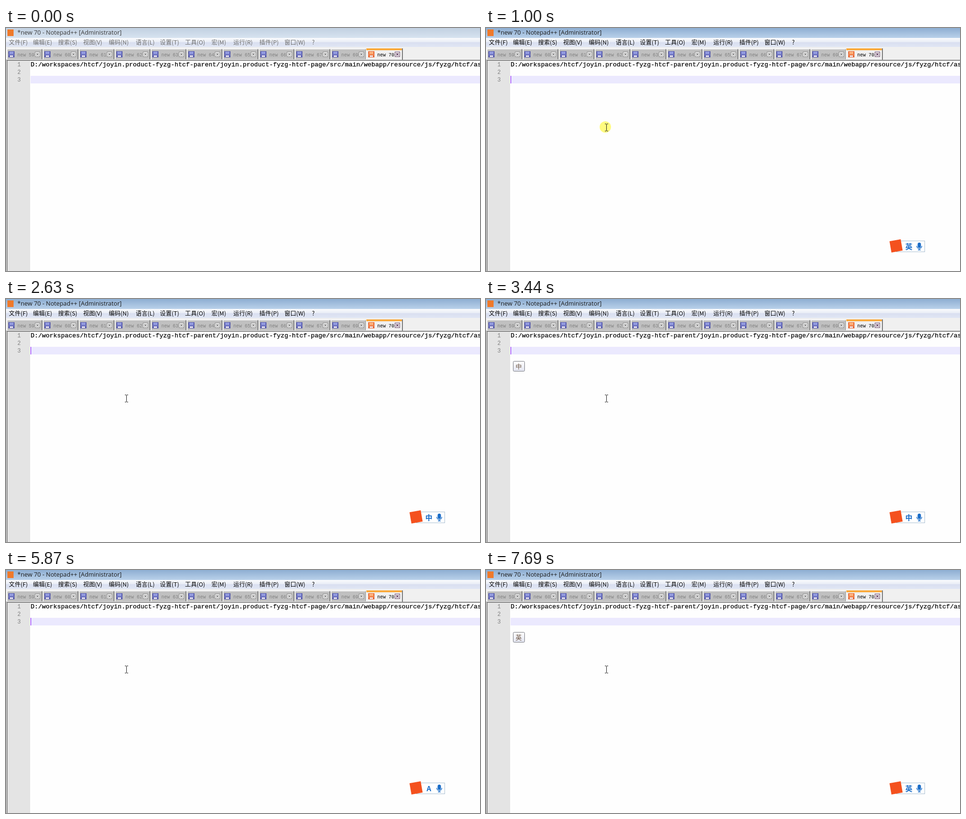
An HTML page that plays this animation: 1001x513 px, repeating every 8 s.

```html
<!DOCTYPE html>
<html lang="zh-CN">
<head>
<meta charset="utf-8">
<title>Editor input mode</title>
<style>
html, body { margin: 0; width: 100%; height: 100%; overflow: hidden; background: #fff; }
svg { display: block; }
text { white-space: pre; }
.title { font: 12.75px "Open Sans", "Noto Sans", sans-serif; fill: #1c1c1c; }
.menu { font: 12.4px "Noto Sans CJK SC", "Noto Sans CJK", sans-serif; fill: #000; }
.tab { font: 10px "Liberation Mono", monospace; fill: #808080; }
.tab.on { fill: #000; }
.code { font: 13.333px "Liberation Mono", monospace; stroke: #000; stroke-width: .25px; }
.num { font: 12px "Liberation Mono", monospace; fill: #808080; }
.mode { font: bold 15px "Noto Sans CJK SC", "Noto Sans CJK", sans-serif; fill: #1a6dc8; text-anchor: middle; }
.hint { font: 13px "Noto Sans CJK SC", "Noto Sans CJK", sans-serif; fill: #69513c; text-anchor: middle; }
.idle .menu { fill: #6d6d6d; }
.idle .title { fill: #3a3a3a; }
</style>
</head>
<body>
<svg id="stage" width="1001" height="513" viewBox="0 0 1001 513">
  <defs>
    <linearGradient id="active" x2="0" y2="1"><stop stop-color="#8eaed2"/><stop offset="1" stop-color="#b9d1ea"/></linearGradient>
    <linearGradient id="idle" x2="0" y2="1"><stop stop-color="#c1d0e1"/><stop offset="1" stop-color="#d7e3f0"/></linearGradient>
    <linearGradient id="menubar" x2="0" y2="1">
      <stop stop-color="#fafbfd"/><stop offset=".45" stop-color="#e9edf6"/>
      <stop offset=".5" stop-color="#d9dff0"/><stop offset="1" stop-color="#e0e6f4"/>
    </linearGradient>
    <linearGradient id="button" x2="0" y2="1"><stop stop-color="#fff"/><stop offset="1" stop-color="#e2e4f0"/></linearGradient>
  </defs>
  <rect width="1001" height="513" fill="#fefefe"/>
  <rect id="titlebar" width="1001" height="21"/>
  <rect x="3" y="3" width="13" height="14" fill="#ee7a2c"/>
  <text class="title" x="24" y="14">*new 70 - Notepad++ [Administrator]</text>
  <rect y="21" width="1001" height="19" fill="url(#menubar)"/>
  <g id="menus"></g>
  <rect y="40" width="1001" height="28" fill="#f0f0f0"/>
  <g id="tabs"></g>
  <rect y="67" width="1001" height="1" fill="#a0a0a0"/>
  <rect y="68" width="1001" height="1" fill="#696969"/>
  <rect y="68" width="1" height="445" fill="#f0f0f0"/>
  <rect x="1" y="67" width="1" height="446" fill="#a0a0a0"/>
  <rect x="2" y="68" width="1" height="445" fill="#696969"/>
  <rect x="3" y="69" width="48" height="444" fill="#e4e4e4"/>
  <rect x="52" y="101" width="949" height="16" fill="#ebe9fe"/>
  <text class="num" x="24" y="81">1</text>
  <text class="num" x="24" y="97">2</text>
  <text class="num" x="24" y="113">3</text>
  <text class="code" x="52" y="81">D:/workspaces/htcf/joyin.product-fyzg-htcf-parent/joyin.product-fyzg-htcf-page/src/main/webapp/resource/js/fyzg/htcf/as</text>
  <rect id="caret" x="52" y="101" width="1" height="16" fill="#8000ff"/>
  <g id="hint">
    <rect x="57.5" y="131.5" width="24" height="21" rx="2" fill="url(#button)" stroke="#73757c"/>
    <text class="hint" x="69" y="146.5"></text>
  </g>
  <g id="bar">
    <rect x="866.5" y="449.5" width="60" height="23" fill="#fff" stroke="#a9bfd2"/>
    <rect x="854" y="448" width="24" height="24" fill="#f4511e" transform="rotate(-10 866 460)"/>
    <text class="mode" x="893" y="466.5"></text>
    <rect x="911.5" y="453" width="7" height="11" rx="3.5" fill="#1a6dc8"/>
    <path d="M909.5 460a5.5 5.5 0 0 0 11 0M915 465.5v3M912 468.5h6" fill="none" stroke="#1a6dc8" stroke-width="1.4"/>
  </g>
  <circle id="click" cx="252" cy="209" r="12" fill="#fffb80"/>
  <path id="pointer" d="M0 0h3v1h1v-1h3v1h-3v14h3v1h-3v-1h-1v1h-3v-1h3v-14h-3z" fill="#1a1a1a"/>
</svg>
<script>
const $ = id => document.getElementById(id);
const LOOP = 8000;

const menus = [[6, '文件(F)'], [57, '编辑(E)'], [110, '搜索(S)'], [163, '视图(V)'], [217, '编码(N)'],
  [274, '语言(L)'], [325, '设置(T)'], [378, '工具(O)'], [434, '宏(M)'], [480, '运行(R)'],
  [535, '插件(P)'], [588, '窗口(W)'], [646, '?']];
$('menus').innerHTML = menus.map(([x, s]) => `<text class="menu" x="${x}" y="35">${s}</text>`).join('');

const rect = (x, y, w, h, fill) => `<rect x="${x}" y="${y}" width="${w}" height="${h}" fill="${fill}"/>`;

function disk(x, y, dark, light) {
  return rect(x, y, 13, 13, dark) + rect(x + 2, y + 1, 9, 5, light) +
    rect(x + 1, y + 7, 11, 1, light) + rect(x + 3, y + 9, 7, 3, '#eeeaf2');
}

function cross(x, y, color) {
  return `<rect x="${x + .5}" y="${y + .5}" width="10" height="10" fill="#eee" stroke="${color}"/>` +
    `<path d="M${x + 3} ${y + 3}l5 5m0 -5l-5 5" stroke="${color}" stroke-width="1.6"/>`;
}

function tab(name, i) {
  const x = 2 + 76 * i, on = name === 70;
  const body = on
    ? rect(x - 1, 42, 77, 25, '#f0f0f0') + rect(x - 1, 43, 76, 4, '#faaa3c') +
      rect(x - 2, 43, 1, 24, '#fff') + rect(x + 74, 43, 1, 24, '#a0a0a0') + rect(x + 75, 43, 1, 24, '#555')
    : rect(x, 44, 74, 22, '#c0c0c0') + rect(x, 44, 73, 1, '#fff') + rect(x, 44, 1, 22, '#fff') +
      rect(x + 73, 45, 1, 21, '#909090') + rect(x + 74, 45, 1, 21, '#606060');
  return body + (on ? disk(x + 3, 49, '#e8622c', '#ffb27c') : disk(x + 3, 49, '#5458ac', '#949ce0')) +
    `<text class="tab ${on ? 'on' : ''}" x="${x + 22}" y="60">new ${name}</text>` +
    cross(x + 59, 50, on ? '#6b4468' : '#8a8a8a');
}
$('tabs').innerHTML = [59, 60, 61, 62, 63, 64, 65, 66, 67, 69, 70].map(tab).join('');

// Each track is a list of [start time, value].
const pointer = [[0, null], [400, [451, 421]], [600, [314, 248]], [800, [257, 207]], [1000, [251, 202]]];
const mode = [[0, ''], [1000, '英'], [2630, '中'], [3850, '英'], [5870, 'A'], [6880, '英']];
const hint = [[0, ''], [1410, '英'], [2420, ''], [2830, '中'], [3640, ''], [4050, '英'],
  [5060, ''], [6070, 'A'], [7080, '英']];
const blinks = [1000, 1610, 2220, 2830, 3440, 4050, 4660, 5260, 5870, 6480, 7080, 7690];

const at = (track, t) => track.filter(([start]) => start <= t).pop()[1];
const show = (id, on) => $(id).setAttribute('visibility', on ? 'visible' : 'hidden');

function label(id, s) {
  show(id, s);
  $(id).querySelector('text').textContent = s;
}

function draw(t) {
  const active = t >= 1000, pos = at(pointer, t);
  $('stage').classList.toggle('idle', !active);
  $('titlebar').setAttribute('fill', active ? 'url(#active)' : 'url(#idle)');
  show('caret', blinks.filter(b => b <= t).length % 2);
  show('click', active && t < 1210);
  show('pointer', pos);
  if (pos) $('pointer').setAttribute('transform', `translate(${pos})`);
  label('bar', at(mode, t));
  label('hint', at(hint, t));
}

const begin = performance.now();
function frame() {
  draw((performance.now() - begin) % LOOP);
  requestAnimationFrame(frame);
}
frame();
</script>
</body>
</html>
```
